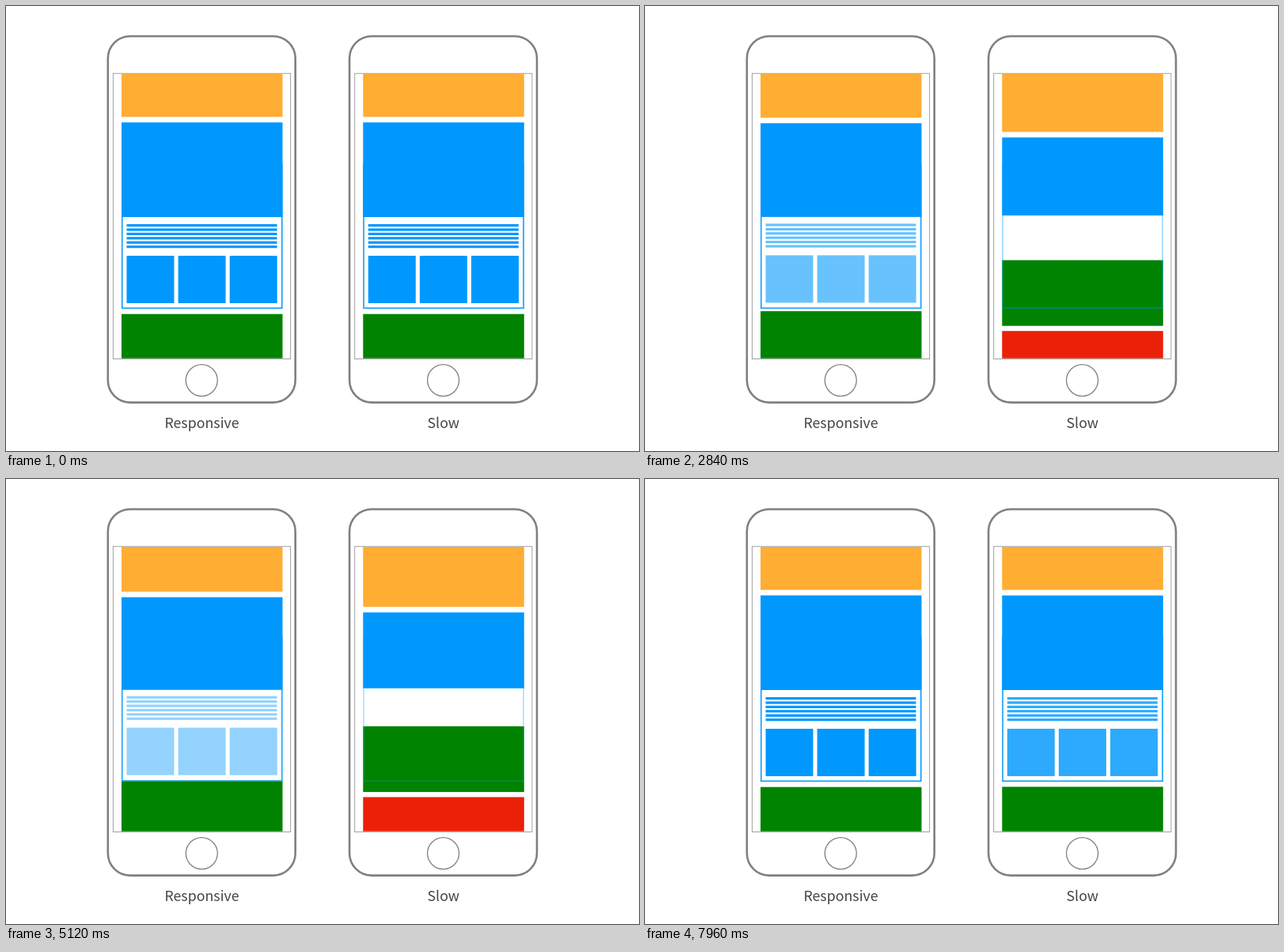
Animation of 800x563 px, one loop 8000 ms. Source, as an HTML page with a canvas:

```html
<!DOCTYPE html>
<html lang="en">
<head>
<meta charset="utf-8">
<title>Responsive and slow transitions</title>
<style>
  html, body { margin: 0; width: 100%; height: 100%; overflow: hidden; background: #fff; }
  canvas { position: absolute; left: 0; top: 0; width: 800px; height: 563px; }
  p {
    position: absolute; top: 512px; width: 200px; margin: 0; text-align: center;
    font: 17.8px/29px "Noto Sans CJK JP", "Noto Sans CJK SC", "Noto Sans CJK", "Open Sans", sans-serif;
    color: #444;
  }
</style>
</head>
<body>
<canvas width="800" height="563"></canvas>
<p style="left:147.5px">Responsive</p>
<p style="left:452.8px">Slow</p>
<script>
const canvas = document.querySelector('canvas');
const ctx = canvas.getContext('2d');
const LOOP = 8000;
const ORANGE = '#ffad33', BLUE = '#0098fd', GREEN = '#008300', RED = '#eb2008';

// Toggle times; even entries collapse the card, odd ones expand it.
const TOGGLES = [1496, 2674, 3795, 4975, 6202, 7362];
const PHONES = [
  { x: 0, expand: 213, collapse: 242 },
  { x: 305.3, expand: 640, collapse: 735 }
];
const FADE_DELAY = 0.225;

const clamp = v => Math.min(1, Math.max(0, v));
const mix = (a, b, t) => a + (b - a) * t;

function bezier(x1, y1, x2, y2) {
  const at = (a, b, s) => 3 * (1 - s) * (1 - s) * s * a + 3 * (1 - s) * s * s * b + s * s * s;
  return x => {
    if (x <= 0) return 0;
    if (x >= 1) return 1;
    let lo = 0, hi = 1;
    for (let i = 0; i < 24; i++) {
      const mid = (lo + hi) / 2;
      if (at(x1, x2, mid) < x) lo = mid; else hi = mid;
    }
    return at(y1, y2, lo);
  };
}
const ease = bezier(0.25, 0.1, 0.25, 1);
const easeInOut = bezier(0.42, 0, 0.58, 1);

// How far the card is open, and how visible its contents are.
function stateAt(t, phone) {
  let i = TOGGLES.length - 1;
  while (i >= 0 && TOGGLES[i] > t) i--;
  if (i < 0) return { open: 1, fade: 1 };
  const age = t - TOGGLES[i];
  if (i % 2 === 0) {
    const open = 1 - ease(clamp(age / phone.collapse));
    return { open, fade: open };
  }
  const x = age / phone.expand;
  return { open: ease(clamp(x)), fade: easeInOut(clamp(x - FADE_DELAY)) };
}

function block(color, top, bottom) {
  ctx.fillStyle = color;
  ctx.fillRect(146, top, 203.5, bottom - top);
}

function drawDetails(open, fade) {
  const dy = -20 * (1 - open);
  ctx.globalAlpha = fade;
  ctx.fillStyle = BLUE;
  for (let i = 0; i < 6; i++) ctx.fillRect(152.5, 276 + i * 5.4 + dy, 190, 3.2);
  for (let i = 0; i < 3; i++) ctx.fillRect(152.5 + i * 65.1, 316 + dy, 60, 60);
  ctx.globalAlpha = open;
  ctx.strokeStyle = BLUE;
  ctx.lineWidth = 1.5;
  ctx.strokeRect(146.75, 200, 202, 182.2);
  ctx.globalAlpha = 1;
}

function drawScreen({ open, fade }) {
  const up = -33.3 * open, down = 119.3 * open;
  ctx.save();
  ctx.beginPath();
  ctx.rect(135, 86, 225, 359.8);
  ctx.clip();
  block(ORANGE, 90.6 + up, 173.6 + up);
  block(GREEN, 270.4 + down, 353.5 + down);
  block(RED, 360 + down, 443 + down);
  drawDetails(open, fade);
  block(BLUE, 180.6 + up, mix(263.6, 267, open));
  ctx.restore();
}

function drawFrame() {
  ctx.strokeStyle = '#808080';
  ctx.lineWidth = 2.6;
  ctx.beginPath();
  ctx.roundRect(128.8, 38.2, 236.9, 463.4, 28);
  ctx.stroke();
  ctx.lineWidth = 1.3;
  ctx.beginPath();
  ctx.arc(247.3, 473.6, 20, 0, Math.PI * 2);
  ctx.stroke();
  ctx.strokeStyle = '#a0a0a0';
  ctx.lineWidth = 1;
  ctx.strokeRect(135.4, 85.3, 224.2, 361.2);
}

function draw(t) {
  ctx.clearRect(0, 0, 800, 563);
  for (const phone of PHONES) {
    ctx.save();
    ctx.translate(phone.x, 0);
    drawFrame();
    drawScreen(stateAt(t, phone));
    ctx.restore();
  }
}

let start = null;
function tick(now) {
  if (start === null) start = now;
  draw((now - start) % LOOP);
  requestAnimationFrame(tick);
}
draw(0);
requestAnimationFrame(tick);
</script>
</body>
</html>
```
